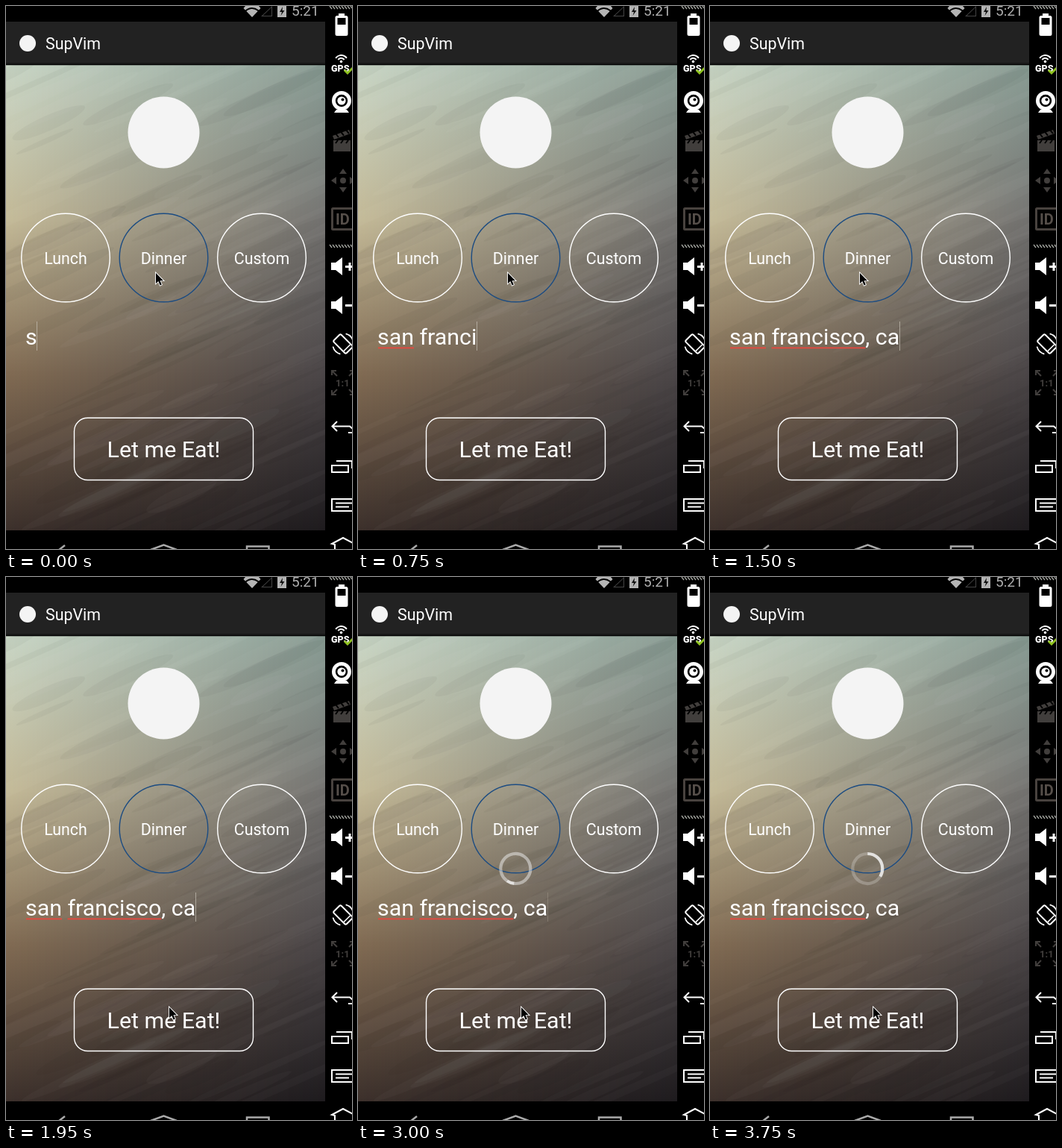
An HTML page with a canvas for the animation above (8000 ms loop, 464 by 728 pixels).

```html
<!DOCTYPE html>
<html lang="en">
<head>
<meta charset="utf-8">
<title>Meal finder</title>
<style>
html, body { margin: 0; width: 100%; height: 100%; overflow: hidden; background: #000; }
canvas { display: block; }
</style>
</head>
<body>
<canvas id="stage" width="464" height="728"></canvas>
<script>
const W = 464, H = 728, LOOP = 8000, STEP = 150;
const APP = { w: 428, top: 79, h: 624 };
const FONT = 'Roboto, "Open Sans", sans-serif';
const WHITE = '#fff', DIM = '#413e3c';
const stage = document.getElementById('stage').getContext('2d');
const still = document.createElement('canvas');
still.width = W;
still.height = H;
let g = still.getContext('2d');

const mix = (a, b, k) => a + (b - a) * k;
const rgb = hex => [1, 3, 5].map(i => parseInt(hex.slice(i, i + 2), 16));
const rad = deg => deg * Math.PI / 180;

function randomFrom(seed) {
  return () => (seed = seed * 16807 % 2147483647) / 2147483647;
}

// ---- drawing helpers ----
function fill(d, color) {
  g.fillStyle = color;
  g.fill(new Path2D(d));
}
function stroke(d, color = WHITE, width = 2) {
  g.strokeStyle = color;
  g.lineWidth = width;
  g.stroke(new Path2D(d));
}
function rect(x, y, w, h, color) {
  g.fillStyle = color;
  g.fillRect(x, y, w, h);
}
function box(x, y, w, h, r, color = WHITE, width = 2) {
  g.beginPath();
  g.roundRect(x, y, w, h, r);
  g.strokeStyle = color;
  g.lineWidth = width;
  g.stroke();
}
function disc(x, y, r, color) {
  g.beginPath();
  g.arc(x, y, r, 0, 7);
  g.fillStyle = color;
  g.fill();
}
function arc(x, y, r, from, to, color = WHITE, width = 2) {
  g.beginPath();
  g.arc(x, y, r, rad(from), rad(to));
  g.strokeStyle = color;
  g.lineWidth = width;
  g.stroke();
}
function text(str, x, y, size, color = WHITE, align = 'left', weight = 400) {
  g.font = `${weight} ${size}px ${FONT}`;
  g.textAlign = align;
  g.fillStyle = color;
  g.fillText(str, x, y);
}
// Runs a drawing around a moved, turned and scaled centre.
function at(x, y, draw, deg = 0, sx = 1, sy = 1) {
  g.save();
  g.translate(x, y);
  g.rotate(rad(deg));
  g.scale(sx, sy);
  draw();
  g.restore();
}

// ---- blurred photo: a vertical ramp per column, blended left to right ----
function backdrop() {
  const left = ['#c9d6c6', '#c3b997', '#806a52', '#3c302b'].map(rgb);
  const right = ['#899c94', '#757472', '#4a4547', '#1e1b1e'].map(rgb);
  const { w, top, h } = APP;
  for (let x = 0; x < w; x++) {
    const ramp = g.createLinearGradient(0, top, 0, top + h);
    left.forEach((c, i) => {
      const color = c.map((v, j) => Math.round(mix(v, right[i][j], x / w)));
      ramp.addColorStop(i / 3, `rgb(${color})`);
    });
    rect(x, top, 1, h, ramp);
  }

  // faint slanted brush marks
  const random = randomFrom(11);
  g.save();
  g.beginPath();
  g.rect(0, top, w, h);
  g.clip();
  for (let i = 0; i < 110; i++) {
    const x = random() * w, y = top + random() * h;
    const long = 40 + random() * 120, thin = 3 + random() * 9;
    const color = i % 2 ? 'rgba(255,245,225,.022)' : 'rgba(0,0,10,.035)';
    at(x, y, () => {
      g.beginPath();
      g.ellipse(0, 0, long, thin, 0, 0, 7);
      g.fillStyle = color;
      g.fill();
    }, -24);
  }
  g.restore();
}

function statusBar() {
  fill('M318.5 3 321 0H339L341.5 3 330 15z', '#b4b4b4');
  arc(330, 15, 12, 220, 320, '#000', 2);
  fill('M342 14H357V0z', '#444');
  fill('M344.5 13H356V2z', '#000');
  rect(364, 0, 12, 15, '#b4b4b4');
  fill('M371 1 367 8h3l-1.5 5 5-7h-3z', '#111');
  text('5:21', 383, 13, 19, '#b0b0b0');
}

function navBar() {
  stroke('M79 723 66 733M194 729l17.5-6.5L229 729M323 729v-4.5h29.5v4.5', '#aaa', 2.5);
}

function hatch(y) {
  for (let x = 434; x < W; x += 4) stroke(`M${x} ${y - 2}l3 4`, '#a8aaa4', 1.3);
}

function speaker(y, plus) {
  fill(`M436 ${y - 5}h6l9-7v24l-9-7h-6z`, WHITE);
  rect(455, y - 1, 9, 3, WHITE);
  if (plus) rect(459.5, y - 5, 3, 11, WHITE);
}

function battery() {
  rect(446, 10, 8, 4, WHITE);
  box(443, 14.5, 14, 24, 1, WHITE, 3);
  rect(444, 25, 12, 13, WHITE);
}

function gps() {
  for (const r of [5, 9]) arc(449.5, 75, r, 215, 325);
  disc(449.5, 74.5, 1.8, WHITE);
  text('GPS', 436, 88, 12.5, WHITE, 'left', 900);
  stroke('M454 86l4 4 7-7', '#8fc31f', 3);
}

function webcam() {
  [13, 8.2, 5.6].forEach((r, i) => disc(450, 127, r, i % 2 ? '#000' : WHITE));
  disc(451.5, 125.5, 2, '#000');
  fill('M440 143l3-4h14l3 4z', WHITE);
}

function clapper() {
  rect(439, 180, 23, 15, DIM);
  fill('M438 174l22-8 2 5-22 8z', DIM);
  for (let i = 0; i < 3; i++) {
    stroke(`M${442 + i * 7} ${171 - i * 2.4}l4 5m-1 ${4 + i * 2.4}l-3 4`, '#000');
  }
}

function arrows() {
  disc(452, 234, 4, DIM);
  for (let i = 0; i < 4; i++) at(452, 234, () => fill('M-5-9 0-16 5-9z', DIM), i * 90);
}

function turnIcon() {
  at(452, 453, () => {
    box(-7, -12, 14, 24, 2);
    stroke('M-6.5 7.5h13', WHITE, 1.5);
  }, -45);
  for (const a of [-75, 105]) arc(452, 453, 14, a, a + 60, WHITE, 1.8);
}

function zoomIcon() {
  text('1:1', 442, 510, 13, DIM, 'left', 700);
  for (const sx of [1, -1]) {
    for (const sy of [1, -1]) {
      at(452, 505, () => stroke('M-15-10v-6h6m-6 0l7 7', DIM), 0, sx, sy);
    }
  }
}

function sidebar() {
  hatch(2);
  battery();
  gps();
  webcam();
  clapper();
  arrows();
  box(437.5, 271.5, 34, 28, 1, '#48423e', 3);
  text('ID', 442, 293, 20, '#554e49', 'left', 700);
  hatch(322);
  speaker(349, true);
  speaker(401, false);
  turnIcon();
  zoomIcon();
  stroke('M444 557l-6.5 6.5 6.5 6.5M438 563.5h23l4 3.5M459 572h6');
  stroke('M437 616h22v9h-22zM443 610h22M464 610v10');
  stroke('M465 661h-28v16h28M442 666.5h23M442 671.5h18');
  stroke('M441 730v-8l-4-1 15-8 15 8');
}

function drawStill() {
  rect(0, 0, W, H, '#000');
  backdrop();
  rect(0, 21, APP.w, 57, '#222');
  rect(0, 76, APP.w, 2, '#191919');
  rect(0, 78, APP.w, 2, 'rgba(0,0,0,.3)');
  statusBar();
  disc(29, 50, 11, '#f4f4f4');
  text('SupVim', 53, 58, 21.4);
  disc(211.5, 169.5, 48, '#f4f4f4');

  ['Lunch', 'Dinner', 'Custom'].forEach((label, i) => {
    const x = 80 + i * 131.5;
    arc(x, 337.5, 59.3, 0, 360, label === 'Dinner' ? '#1c4c82' : WHITE, 1.4);
    text(label, x, 346, 21.4, WHITE, 'center');
  });
  box(91.5, 552.3, 240, 83.2, 18, WHITE, 1.4);
  text('Let me Eat!', 211.5, 605, 30.4, WHITE, 'center');
  navBar();
  sidebar();
}

// ---- moving parts ----
const KEYS = 's|an |f|ra|nc|i|sco||,| c|a'.split('|'); // letters typed in each step
const SPIN_START = 2550, SPIN_END = 3750;
const POSES = [
  { t: SPIN_START, ring: 0, start: -55, len: 290, glow: 0.72 },
  { t: 3000, ring: 0.52, start: 95, len: 30, glow: 0.85 },
  { t: SPIN_END, ring: 0.27, start: 270, len: 122, glow: 0.85 }
];

function field(t) {
  const str = KEYS.slice(0, Math.floor(t / STEP) + 1).join('');
  const x = 26;
  text(str, x, 454, 30.4);
  const edge = n => x + g.measureText(str.slice(0, n)).width;
  const underline = (from, to) => rect(from, 457.5, to - from, 1.8, '#e8483f');
  if (str.length > 4) underline(x + 1, edge(3));
  if (str.includes(',')) underline(edge(4), edge(13));
  if (t < 3150) {
    const color = t < SPIN_START ? 'rgba(205,200,190,.65)' : 'rgba(190,180,165,.3)';
    rect(Math.floor(edge(str.length)), 423, 1, 39, color);
  }
}

function spinner(t) {
  if (t < SPIN_START) return;
  const s = Math.min(SPIN_END, Math.floor(t / STEP) * STEP);
  const i = s < POSES[1].t ? 0 : 1;
  const a = POSES[i], b = POSES[i + 1];
  const k = (s - a.t) / (b.t - a.t);
  const now = key => mix(a[key], b[key], k);
  const from = now('start'), to = from + now('len');
  arc(211.3, 391, 20, to, from + 360, `rgba(235,235,235,${now('ring')})`, 4.2);
  arc(211.3, 391, 20, from, to, `rgba(245,245,245,${now('glow')})`, 4.2);
}

function pointer(t) {
  const [x, y] = t < 1800 ? [200, 357] : t < 1950 ? [207, 455] : [218, 576];
  const shape = 'M0 0V14L3.3 11 5.6 16.6 7.8 15.6 5.5 10.2H10z';
  at(x + 1, y + 1, () => {
    stroke(shape, WHITE, 1.8);
    fill(shape, '#000');
  });
}

function tick(now) {
  const t = now % LOOP;
  g.drawImage(still, 0, 0);
  field(t);
  spinner(t);
  pointer(t);
  requestAnimationFrame(tick);
}

drawStill();
g = stage;
tick(0);
</script>
</body>
</html>
```
